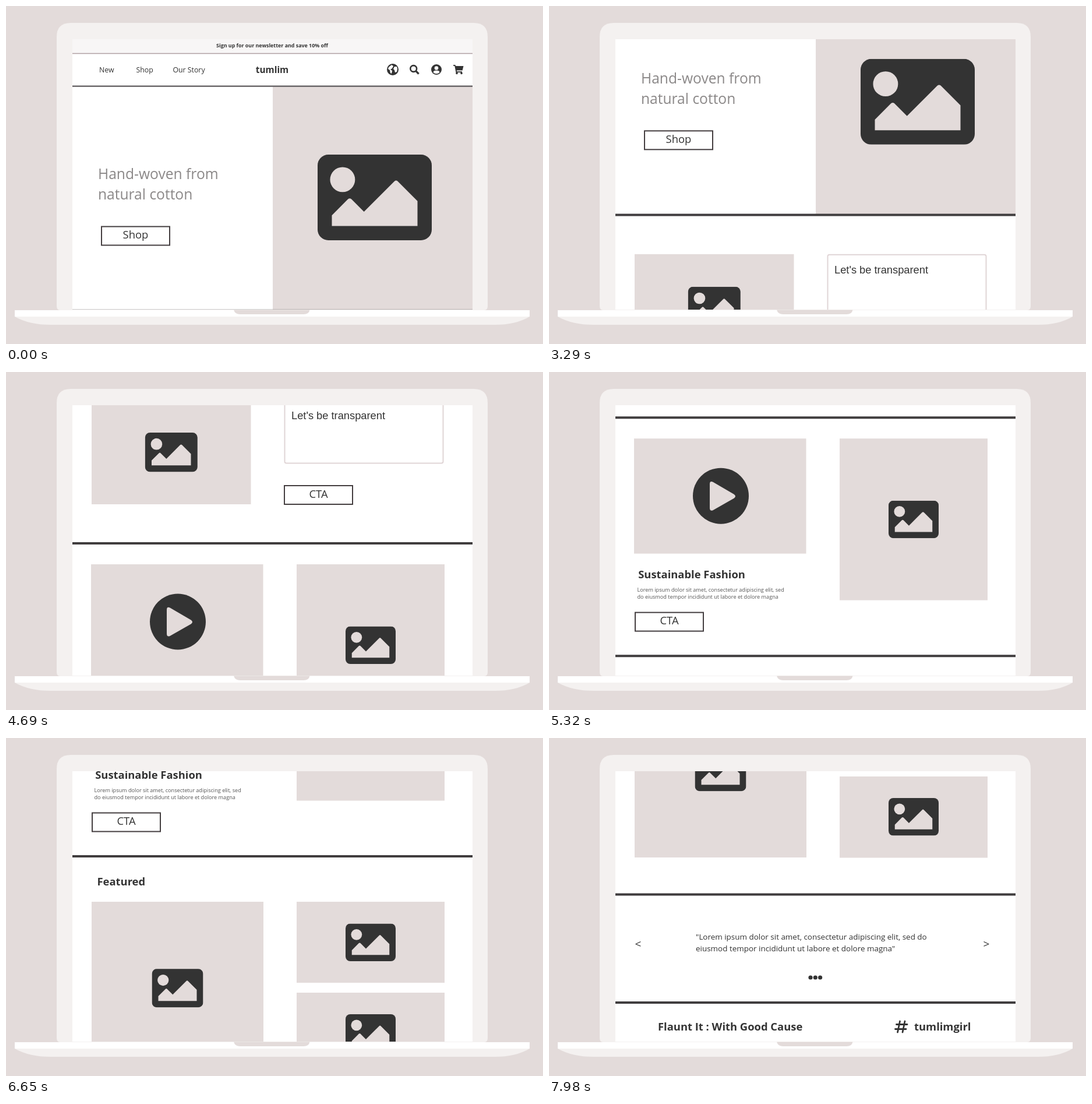
Animation of 922x580 px, one loop 8 s. Source, as an HTML page:

```html
<!DOCTYPE html>
<html lang="en">
<head>
<meta charset="utf-8">
<title>Shop wireframe scroll</title>
<style>
  html, body { margin: 0; width: 100%; height: 100%; overflow: hidden; background: #e3dbda; }
  svg { display: block; width: 922px; height: 580px; font-family: "Open Sans", sans-serif; }
  text { fill: #333; white-space: pre; }
  .tint { fill: #e3dbda; }
  .dark { fill: #333; }
  .shell { fill: #f4f1f0; }
  .rule { fill: none; stroke: #403d3e; stroke-width: 4; }
  .button rect { fill: #fff; stroke: #443e40; stroke-width: 2; }
  .button text { font-size: 18.4px; text-anchor: middle; }
  .nav { font-size: 12.3px; }
  .hero { font-size: 24.6px; fill: #8b8888; }
  .heading { font-size: 18.4px; font-weight: 700; }
  .small { font-size: 9.15px; fill: #555; }
  .quote { font-size: 13.45px; }
  .arrow { font-size: 19px; text-anchor: middle; }
</style>
</head>
<body>
<svg viewBox="0 0 922 580">
  <defs>
    <clipPath id="screen"><rect x="114" y="57" width="687" height="464"/></clipPath>
    <symbol id="picture" viewBox="0 0 512 384">
      <rect class="dark" width="512" height="384" rx="48"/>
      <circle class="tint" cx="112" cy="112" r="56"/>
      <path class="tint" d="M64 320H448V208L360 120Q352 113 344 120L208 256L152 200Q144 193 136 200L64 272Z"/>
    </symbol>
  </defs>

  <rect class="tint" width="922" height="580"/>

  <!-- laptop -->
  <path class="shell" d="M87 53Q87 29 111 29H803Q827 29 827 53V515Q827 522 821 522H93Q87 522 87 515Z"/>
  <path class="shell" d="M15 533H899Q875 547 840 547H76Q40 547 15 533Z"/>
  <rect x="15" y="522" width="884" height="11" fill="#fff"/>
  <path class="tint" d="M391 521.5H521.5Q520 529 511 529H402Q393 529 391 521.5Z"/>

  <g clip-path="url(#screen)">
    <rect x="114" y="57" width="687" height="464" fill="#fff"/>
    <g id="page">
      <!-- header -->
      <rect x="114" y="57" width="687" height="24" fill="#f8f6f6"/>
      <text x="457" y="71" text-anchor="middle" font-size="8.9" font-weight="700">Sign up for our newsletter and save 10% off</text>
      <path d="M114 81.5H801" stroke="#b09fa2" stroke-width="1.5"/>
      <g class="nav">
        <text x="160" y="114">New</text>
        <text x="223.5" y="114">Shop</text>
        <text x="286.5" y="114">Our Story</text>
      </g>
      <text x="457" y="115" text-anchor="middle" font-size="15.4" font-weight="700">tumlim</text>
      <g transform="translate(664 109)">
        <circle class="dark" r="10"/>
        <path fill="#fff" d="M-7-4L-2-8L1-6L-1-2L-4 0L-1 2L-2 7L-4 6L-5 1L-8-1ZM3-5L7-5L8-1L7 4L4 5L3 1L1-1Z"/>
      </g>
      <g transform="translate(701 109)" fill="none" stroke="#333">
        <circle cx="-1.3" cy="-1.5" r="5.4" stroke-width="2.6"/>
        <path d="M2.8 2.7L7.6 7.5" stroke-width="3.2"/>
      </g>
      <g transform="translate(739 109)">
        <circle class="dark" r="9"/>
        <circle cy="-2.5" r="3.3" fill="#fff"/>
        <path d="M-5.5 5Q-4.5 1.8-2 1.8H2Q4.5 1.8 5.5 5Q0 9.5-5.5 5Z" fill="#fff"/>
      </g>
      <g transform="translate(777 109)" class="dark">
        <path d="M-9-8H-5.5L-5-6H8.5L6.7 1.6H-3.3L-3 3.3H6V5H-4.5L-6.7-6.2H-9Z"/>
        <circle cx="-3" cy="6.4" r="1.8"/><circle cx="5" cy="6.4" r="1.8"/>
      </g>

      <!-- hero -->
      <rect class="tint" x="458" y="138" width="343" height="384"/>
      <path d="M114 137.7H801" stroke="#5c595b" stroke-width="2.2"/>
      <text class="hero" x="158" y="297">Hand-woven from</text>
      <text class="hero" x="158" y="332">natural cotton</text>
      <g class="button"><rect x="164" y="378.5" width="117" height="32"/><text x="222.5" y="398.8">Shop</text></g>
      <use href="#picture" x="535" y="255" width="196" height="147"/>
      <path class="rule" d="M114 522.7H801"/>

      <!-- transparency -->
      <rect class="tint" x="147" y="590" width="273.5" height="179"/>
      <use href="#picture" x="238.5" y="646" width="90.5" height="67.5"/>
      <rect x="478.5" y="591" width="272" height="107.5" rx="3" fill="#fff" stroke="#e0d5d6" stroke-width="2"/>
      <text x="490" y="623" font-size="18.3" style="font-family:'Liberation Sans',sans-serif">Let's be transparent</text>
      <g class="button"><rect x="478" y="737" width="117" height="32"/><text x="536.5" y="757.8">CTA</text></g>
      <path class="rule" d="M114 836H801"/>

      <!-- sustainable fashion -->
      <rect class="tint" x="146" y="872" width="295.5" height="197.5"/>
      <circle class="dark" cx="295" cy="970.5" r="48"/>
      <path class="tint" d="M276 950Q276 944 281.500 946.500L317.500 967.500Q322.500 971 317.500 974.500L281.500 995Q276 997 276 991Z"/>
      <rect class="tint" x="499" y="872" width="254" height="277.500"/>
      <use href="#picture" x="583" y="978.5" width="86" height="64.5"/>
      <text class="heading" x="153.200" y="1111.500">Sustainable Fashion</text>
      <text class="small" x="151.500" y="1135">Lorem ipsum dolor sit amet, consectetur adipiscing elit, sed</text>
      <text class="small" x="151.500" y="1147">do eiusmod tempor incididunt ut labore et dolore magna</text>
      <g class="button"><rect x="148" y="1170.500" width="117" height="32"/><text x="206.500" y="1191.300">CTA</text></g>
      <path class="rule" d="M114 1245H801"/>

      <!-- featured -->
      <text class="heading" x="156.500" y="1294.500">Featured</text>
      <rect class="tint" x="147" y="1323" width="295" height="295"/>
      <use href="#picture" x="250.500" y="1438" width="88" height="66.500"/>
      <rect class="tint" x="499" y="1323" width="254" height="139"/>
      <use href="#picture" x="583" y="1360.500" width="86" height="64.500"/>
      <rect class="tint" x="499" y="1479" width="254" height="139.500"/>
      <use href="#picture" x="583" y="1516" width="86" height="64.500"/>
      <path class="rule" d="M114 1681.500H801"/>

      <!-- testimonial -->
      <text class="arrow" x="153" y="1773">&lt;</text>
      <text class="arrow" x="751" y="1773">&gt;</text>
      <text class="quote" x="252" y="1758.500">"Lorem ipsum dolor sit amet, consectetur adipiscing elit, sed do</text>
      <text class="quote" x="252" y="1778.500">eiusmod tempor incididunt ut labore et dolore magna"</text>
      <g class="dark">
        <circle cx="449" cy="1824" r="3.600"/><circle cx="457.300" cy="1824" r="3.600"/><circle cx="465.600" cy="1824" r="3.600"/>
      </g>
      <path class="rule" d="M114 1867H801"/>

      <!-- footer -->
      <text class="heading" x="187" y="1914.500">Flaunt It : With Good Cause</text>
      <path d="M602.500 1899L598.500 1918M611 1899L607 1918M596.500 1904.500H615M594.500 1912.500H613" fill="none" stroke="#333" stroke-width="2.800" stroke-linecap="round"/>
      <text class="heading" x="627" y="1914.500">tumlimgirl</text>
    </g>
  </g>
</svg>
<script>
  const LOOP = 8000, STEP = 70;
  // [time in ms, scroll offset in px]
  const stops = [[0, 0], [2030, 0], [2380, 59], [2870, 160], [3220, 160], [3780, 304],
                 [4690, 542], [5880, 924.5], [6650, 1042], [7840, 1413], [8000, 1413]];
  const slopes = stops.slice(1).map(([t, y], i) => (y - stops[i][1]) / (t - stops[i][0]));

  // Harmonic mean of the neighbouring slopes keeps the curve from overshooting.
  const tangents = stops.map((_, i) => {
    const before = slopes[i - 1] || 0, after = slopes[i] || 0;
    return before && after ? 2 * before * after / (before + after) : 0;
  });

  function scrollAt(time) {
    const i = stops.findIndex(([t], k) => k > 0 && time < t) - 1;
    const [t0, y0] = stops[i], [t1, y1] = stops[i + 1];
    const span = t1 - t0, u = (time - t0) / span, v = 1 - u;
    return v * v * ((1 + 2 * u) * y0 + u * span * tangents[i])
         + u * u * ((1 + 2 * v) * y1 - v * span * tangents[i + 1]);
  }

  const page = document.getElementById("page");
  function draw(now) {
    const time = Math.floor((now % LOOP) / STEP) * STEP;
    page.setAttribute("transform", `translate(0 ${-scrollAt(time).toFixed(2)})`);
    requestAnimationFrame(draw);
  }
  draw(performance.now());
</script>
</body>
</html>
```
